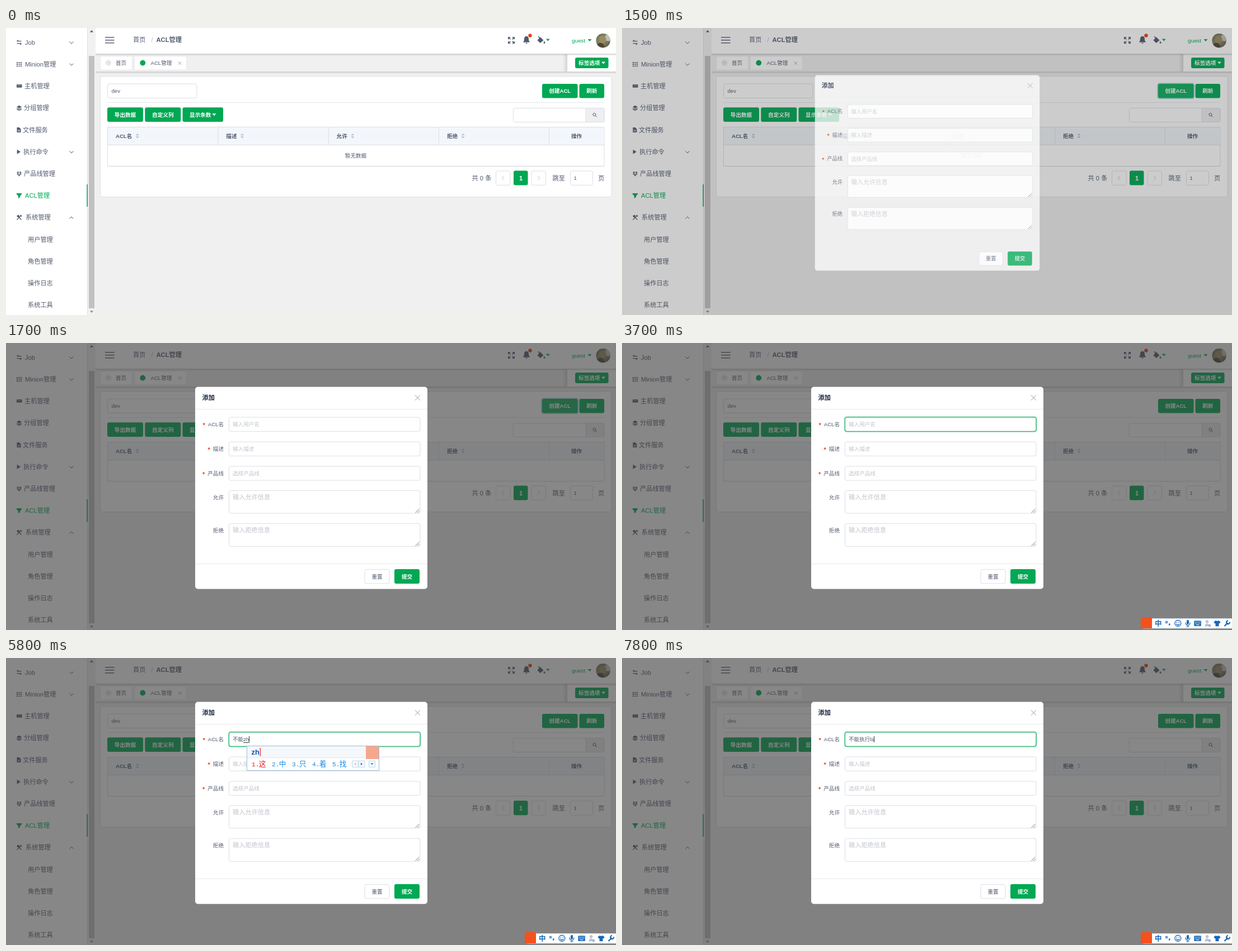
Animation of 1090x514 px, one loop 8000 ms. Source, as an HTML page with a canvas:

```html
<!DOCTYPE html>
<html lang="zh">
<head>
<meta charset="utf-8">
<title>ACL管理</title>
<style>
html, body { margin: 0; width: 100%; height: 100%; overflow: hidden; background: #f0f0f0; }
canvas { display: block; width: 1090px; height: 514px; }
</style>
</head>
<body>
<canvas id="stage"></canvas>
<script>
const W = 1090, H = 514, LOOP = 8000, STEP = 100;
const GREEN = '#00a854', INK = '#515a6e', LINE = '#dcdee2', PALE = '#c0c4cc', RED = '#ed3f14', BLUE = '#1868b7';
const SANS = '"Liberation Sans", "Noto Sans CJK SC", "Noto Sans CJK", sans-serif';
const MONO = '"Liberation Mono", "Noto Sans CJK SC", monospace';

const canvas = document.getElementById('stage');
const dpr = window.devicePixelRatio || 1;
canvas.width = W * dpr;
canvas.height = H * dpr;
const ctx = canvas.getContext('2d');
ctx.scale(dpr, dpr);

const clamp = v => Math.max(0, Math.min(1, v));

// ---- drawing helpers ----
function text(s, x, cy, size = 9.6, color = INK, weight = '', align = 'left', family = SANS) {
  ctx.font = `${weight} ${size}px ${family}`;
  ctx.fillStyle = color;
  ctx.textAlign = align;
  ctx.fillText(s, x, cy + size * 0.37);
  return ctx.measureText(s).width;
}

function rect(x, y, w, h, fill) {
  ctx.fillStyle = fill;
  ctx.fillRect(x, y, w, h);
}

function box(x1, y1, x2, y2, r, fill, stroke, width = 1) {
  ctx.beginPath();
  ctx.roundRect(x1, y1, x2 - x1, y2 - y1, r);
  if (fill) { ctx.fillStyle = fill; ctx.fill(); }
  if (stroke) { ctx.strokeStyle = stroke; ctx.lineWidth = width; ctx.stroke(); }
}

function dot(x, y, r, fill) {
  ctx.beginPath();
  ctx.arc(x, y, r, 0, Math.PI * 2);
  ctx.fillStyle = fill;
  ctx.fill();
}

function shape(d, x, y, fill, stroke, width = 1) {
  const path = new Path2D(d);
  ctx.save();
  ctx.translate(x, y);
  if (fill) { ctx.fillStyle = fill; ctx.fill(path); }
  if (stroke) { ctx.strokeStyle = stroke; ctx.lineWidth = width; ctx.stroke(path); }
  ctx.restore();
}

const caretDown = (x, y, color) => shape('M-3.5-2H3.5L0 2Z', x, y, color);
const cross = (x, y, r, color) => shape(`M${-r} ${-r}L${r} ${r}M${r} ${-r}L${-r} ${r}`, x, y, null, color);

function shade(x, y, w, h, strength, sideways) {
  const g = sideways ? ctx.createLinearGradient(x + w, 0, x, 0) : ctx.createLinearGradient(0, y, 0, y + h);
  g.addColorStop(0, `rgba(0,0,0,${strength})`);
  g.addColorStop(1, 'rgba(0,0,0,0)');
  rect(x, y, w, h, g);
}

function button(label, x1, y1, x2, y2, arrow) {
  box(x1, y1, x2, y2, 3, GREEN);
  const mid = (x1 + x2) / 2, cy = (y1 + y2) / 2;
  text(label, arrow ? mid - 4.5 : mid, cy, 9.6, '#fff', 'bold', 'center');
  if (arrow) caretDown(x2 - (x2 - x1 > 65 ? 16 : 9), cy, '#fff');
}

// ---- sidebar ----
const ICONS = {
  swap: ['', 'M-4-2H4M-4 2H4M-1.5-4.2L-4-2M1.5 4.2L4 2'],
  grid: ['M-4.5-4h2v2h-2zM-1-4h2v2h-2zM2.5-4h2v2h-2zM-4.5-.8h2v2h-2zM-1-.8h2v2h-2zM2.5-.8h2v2h-2zM-4.5 2.4h2v2h-2zM-1 2.4h2v2h-2zM2.5 2.4h2v2h-2z'],
  host: ['M-4.5-3H5V2.5H-4.5Z'],
  layers: ['M0-4.5L4.5-2 0 .5-4.5-2Z', 'M-4.2.2L0 2.3 4.2.2M-4.2 2.2L0 4.3 4.2 2.2'],
  file: ['M-4-4.5H0L3-1.5V4.5H-4Z'],
  play: ['M-3.8-4L2.5 0-3.8 4Z'],
  boxes: ['M-2.2-4L0-2.5-2.2-1-4.5-2.5ZM2.2-4L4.5-2.5 2.2-1 0-2.5ZM-2.2-1L0 .7-2.2 2.2-4.5.7ZM2.2-1L4.5.7 2.2 2.2 0 .7ZM0 1.6L2.2 3 0 4.5-2.2 3Z'],
  funnel: ['M-4.8-4.2H4.8V-2.8L1.6.8V3L-1.6 5V.8L-4.8-2.8Z'],
  tools: ['M-4.5-2.5L-1.5-4.8 1-2.5-2 .2Z', 'M-1.5-1.5L4 4.2M4-4L-4 4.2M2-4.3L4.6-1.6']
};
const MENU = [
  ['Job', 34, 'swap', 1], ['Minion管理', 34, 'grid', 1], ['主机管理', 33, 'host'], ['分组管理', 32, 'layers'],
  ['文件服务', 30, 'file'], ['执行命令', 31, 'play', 1], ['产品线管理', 32, 'boxes'], ['ACL管理', 34, 'funnel'],
  ['系统管理', 35, 'tools', -1], ['用户管理', 39], ['角色管理', 39], ['操作日志', 39], ['系统工具', 39]
];

function sidebar() {
  rect(0, 0, 146, H, '#fff');
  MENU.forEach(([label, x, icon, fold], i) => {
    const cy = 25.7 + i * 39.2, color = icon === 'funnel' ? GREEN : INK;
    text(label, x, cy, 11.2, color);
    if (icon) {
      const [solid, lines] = ICONS[icon];
      shape(solid, 23.5, cy, color, null);
      if (lines) shape(lines, 23.5, cy, null, color, 1.3);
    }
    if (icon === 'host') rect(20.5, cy - 1.5, 6, 1, '#aab0bb');
    if (icon === 'file') { rect(21, cy, 4, .8, '#fff'); rect(21, cy + 2, 4, .8, '#fff'); }
    if (fold) shape(`M-3.6 ${-1.8 * fold}L0 ${1.8 * fold}L3.6 ${-1.8 * fold}`, 117, cy + .5, null, INK);
  });
  rect(145, 0, 1, H, LINE);
  rect(144.4, 280, 1.6, 40, GREEN);
  rect(146, 0, 14, H, '#f1f1f1');
  rect(148, 50, 10, 452, '#c1c1c1');
  shape('M-3 1.5H3L0-2Z', 153, 6, '#505050');
  shape('M-3-1.5H3L0 2Z', 153, 508, '#858585');
}

// ---- top bars ----
function avatar(x, y, r) {
  ctx.save();
  ctx.beginPath();
  ctx.arc(x, y, r, 0, Math.PI * 2);
  ctx.clip();
  const g = ctx.createLinearGradient(x - r, y - r, x + r, y + r);
  g.addColorStop(0, '#65704f');
  g.addColorStop(.55, '#93896a');
  g.addColorStop(1, '#4a4a3c');
  rect(x - r, y - r, 2 * r, 2 * r, g);
  dot(x + 9, y - 5, 6, '#b9c2b8');
  dot(x - 1, y - 2, 6.5, '#9c8a62');
  dot(x - 5, y + 11, 7, '#4c4636');
  ctx.restore();
}

function header() {
  rect(160, 0, 930, 46, '#fff');
  shade(160, 46, 930, 4, .16);
  for (const y of [16, 21, 26]) rect(177, y, 16.5, 1.4, INK);
  text('首页', 227, 21, 11.2);
  text('/', 259.5, 21, 11.2, '#b5b9c2');
  text('ACL管理', 268.5, 21, 11.2, INK, 'bold');
  shape('M-5.3-1.8V-5.3H-1.8M1.8-5.3H5.3V-1.8M5.3 1.8V5.3H1.8M-1.8 5.3H-5.3V1.8M-5-5L-1.6-1.6M5-5L1.6-1.6M5 5L1.6 1.6M-5 5L-1.6 1.6', 903, 22, null, INK, 1.4);
  shape('M0-7C5-6.5 3.6-1 4.5 1.5L6.2 4H-6.2L-4.5 1.5C-3.6-1-5-6.5 0-7ZM-2 5H2Q0 8.5-2 5Z', 930, 21.5, INK);
  dot(936.5, 13.5, 3.2, RED);
  shape('M-1.5-5.5L4.5.5-1.5 5.5-6.5.5ZM6 2Q9 6 6 6.3Q3 6 6 2Z', 956, 21.5, INK);
  shape('M-5-6.5L-1-2', 956, 21.5, null, INK, 1.3);
  caretDown(968.3, 21.5, GREEN);
  text('guest', 1011, 22.5, 9.8, GREEN);
  caretDown(1043, 22, GREEN);
  avatar(1067, 22.5, 12.8);
}

function tabs() {
  box(168.5, 50.5, 225.5, 75, 2, '#fff', '#e8eaec');
  dot(183, 62.5, 4.9, '#e4e6ea');
  text('首页', 196, 62.7);
  box(229.5, 50.5, 322.5, 75, 2, '#fff', '#e8eaec');
  dot(244.3, 62.5, 4.9, GREEN);
  text('ACL管理', 258.5, 62.7);
  cross(310.5, 63, 2.8, '#a0a4ad');
  shade(995, 47, 8, 31, .12, true);
  rect(1003, 47, 87, 31, '#fff');
  button('标签选项', 1017, 53, 1076.5, 72, true);
  shade(160, 78, 930, 4, .16);
}

// ---- content card ----
function sorter(x, y) {
  shape('M-3.2-1H3.2L0-4.2ZM-3.2 1H3.2L0 4.2Z', x, y, '#bcc0c9');
}

function table() {
  box(181.5, 177.5, 1069, 247.5, 0, '#fff', LINE);
  rect(182, 178, 886.5, 31, '#f3f6fb');
  rect(181, 209, 888, 1, LINE);
  rect(181, 247, 888, 1, '#cfd3da');
  ['ACL名', '描述', '允许', '拒绝'].forEach((label, i) => {
    const x = 196 + i * 197.3;
    const w = text(label, x, 193.3, 9.6, INK, 'bold');
    sorter(x + w + 9.5, 193.3);
    rect(378.5 + i * 197.2, 178, 1, 31, LINE);
  });
  text('操作', 1019.5, 193.3, 9.6, INK, 'bold', 'center');
  text('暂无数据', 625, 228, 9.6, INK, '', 'center');
}

function pager() {
  text('共 0 条', 832.5, 268.5, 11.2);
  box(875.5, 256, 901, 281.5, 3, '#fff', LINE);
  box(907, 255.5, 932.5, 281.5, 3, GREEN);
  box(939, 256, 964.5, 281.5, 3, '#fff', LINE);
  shape('M2-3.6L-2 0 2 3.6', 888, 268.5, null, PALE);
  shape('M-2-3.6L2 0-2 3.6', 952, 268.5, null, PALE);
  text('1', 920, 268.5, 11.2, '#fff', 'bold', 'center');
  text('跳至', 976.5, 268.5, 11.2);
  box(1008.5, 256, 1048.5, 281.5, 3, '#fff', LINE);
  text('1', 1014.5, 268.8, 9.6);
  text('页', 1058, 268.5, 11.2);
}

function card(t) {
  box(168.5, 86.5, 1082, 302.5, 3, '#fff', LINE);
  box(181.5, 100, 341, 125.5, 3, '#fff', LINE);
  text('dev', 188.5, 112.8);
  const ring = clamp((t - 900) / 300) * (1 - clamp((t - 2000) / 400));
  if (ring) box(957.2, 99.2, 1022.3, 126.3, 3.5, null, `rgba(70,190,200,${.6 * ring})`, 1.6);
  button('创建ACL', 958, 100, 1021.5, 125.5);
  if (ring) box(958, 100, 1021.5, 125.5, 3, `rgba(255,255,255,${.06 * ring})`);
  button('刷新', 1024.5, 100, 1069, 125.5);
  rect(181, 133, 888, 1, '#e4e6ea');
  button('导出数据', 181, 142.3, 245, 168);
  button('自定义列', 248.3, 142.3, 312.3, 168);
  button('显示条数', 315.5, 142.3, 388, 168, true);
  box(906.5, 143.5, 1069, 168.5, 3, '#fff', LINE);
  box(1036, 143.5, 1069, 168.5, [0, 3, 3, 0], '#eeeff1', LINE);
  dotRing(1051.3, 155, 2.5);
  table();
  pager();
}

function dotRing(x, y, r) {
  ctx.beginPath();
  ctx.arc(x, y, r, 0, Math.PI * 2);
  ctx.moveTo(x + r * .7, y + r * .7);
  ctx.lineTo(x + r * 1.8, y + r * 1.8);
  ctx.strokeStyle = INK;
  ctx.lineWidth = 1;
  ctx.stroke();
}

// ---- typing: time, committed text, letters being composed, candidates ----
const TYPING = [
  [2200, '', ''],
  [4200, '', 'b', '不 吧 把 被 别'],
  [4300, '', 'bu', '不 部 步 布 补'],
  [4700, '不', ''],
  [4900, '不', 'ne', '呢 那 呐 哪 讷'],
  [5100, '不', 'neng', '能 嫩 恁 泞 弄'],
  [5200, '不能', ''],
  [5700, '不能', 'z', '在 这 中 做 再'],
  [5800, '不能', 'zh', '这 中 只 着 找'],
  [5900, '不能', 'zhi', '只 之 直 知 至'],
  [6000, '不能', 'zhix', '执行 之下 知晓 只想 直线'],
  [6100, '不能', 'zhixi', '致谢 窒息 知悉 执行 直系'],
  [6300, '不能', 'zhixin', '执行 知心 之心 至新 置信'],
  [6400, '不能', 'zhixing', '执行 知性 之行 直行 至性'],
  [6600, '不能执行', ''],
  [7100, '不能执行', 'l', '了 来 里 老 两'],
  [7200, '不能执行', 'ls', '老师 历史 老是 临时 零'],
  [7700, '不能执行ls', '']
];
const POPUP_X = { 0: 405, 1: 420, 2: 430, 4: 446 };

const typingAt = t => TYPING.filter(e => e[0] <= t).pop() || [0, '', ''];

function nameField(t) {
  const [since, done, typing] = typingAt(t);
  const focus = clamp((t - 2000) / 400);
  box(398.5, 133, 740, 158.3, 3, '#fff', LINE);
  if (focus) {
    ctx.save();
    ctx.globalAlpha *= focus;
    box(397.8, 132.3, 740.7, 159, 4, null, 'rgba(0,168,84,.3)', 2);
    box(398.5, 133, 740, 158.3, 3, null, '#1fb46a', 1.1);
    ctx.restore();
  }
  const shown = done + typing;
  let end = 405;
  if (shown) {
    const start = 405 + text(done, 405, 145.8);
    end = start + text(typing, start, 145.8);
    if (typing) rect(start, 151, end - start, 1, '#333');
  } else {
    text('输入用户名', 405, 145.5, 9.6, PALE);
  }
  const blinkOn = Math.floor((t - since) / 500) % 2 === 0;
  if (since && (typing || blinkOn)) rect(Math.round(end), 140, 1, 11, '#333');
}

function popup(t) {
  const [, done, typing, list] = typingAt(t);
  if (!typing) return;
  const words = list.split(' ');
  const extra = words.join('').length - words.length;
  const x = POPUP_X[done.length], right = x + 237 + extra * 12.8;
  box(x + .5, 157.5, right - .5, 201.5, 0, '#fff', '#9bbcd8');
  rect(x + 1, 158, right - x - 2, 20, '#f5f8fb');
  rect(x + 1, 178, right - x - 26, 1, '#dde6ee');
  const w = text(typing, x + 8.5, 168.3, 12.8, '#0f51b5', 'bold');
  rect(x + 9.5 + w, 161, 1.2, 15, '#f01818');
  let cx = x + 9;
  words.forEach((word, i) => {
    const color = i ? '#1488e0' : '#f01818';
    text(`${i + 1}.`, cx, 190, 11.2, color, '', 'left', MONO);
    text(word, cx + 12.8, 189.5, 12.8, color);
    cx += 23.2 + word.length * 12.8;
  });
  for (const [dx, d, color] of [[-43, 'M1.5-2.5V2.5L-1.5 0Z', '#b5c5d5'], [-31.5, 'M-1.5-2.5V2.5L1.5 0Z', '#1570c8'], [-13, 'M-2.5-1.2H2.5L0 1.6Z', '#1570c8']]) {
    box(right + dx - 5.5, 184, right + dx + 5.5, 195.5, 0, '#f4f9fd', '#c0d8ea');
    shape(d, right + dx, 189.7, color);
  }
  rect(right - 24, 158, 23, 23, '#f5a78c');
}

// ---- dialog ----
function field(label, y1, y2, hint, required, area) {
  const cy = area ? y1 + 12 : (y1 + y2) / 2;
  const w = text(label, 389, cy - .3, 9.6, INK, '', 'right');
  if (required) text('*', 389 - w - 9.3, cy + 1.5, 11, RED, 'bold');
  if (!hint) return;
  box(398.5, y1, 740, y2, 3, '#fff', LINE);
  text(hint, 405, cy, area ? 11.2 : 9.6, PALE);
  if (area) shape('M-7 0L0-7M-3.2 0L0-3.2', 738.5, y2 - 1, null, '#666', .9);
}

function dialog(t) {
  box(338, 78.5, 753, 440.5, 4.8, '#fff');
  text('添加', 350.5, 98, 11.2, '#17233d', 'bold');
  cross(735.5, 98, 4.6, '#999');
  rect(338, 118, 415, 1, '#e8eaec');
  field('ACL名', 133, 158, '', true);
  nameField(t);
  field('描述', 177, 202.3, '输入描述', true);
  field('产品线', 220.8, 246, '选择产品线', true);
  field('允许', 264.3, 305, '输入允许信息', false, true);
  field('拒绝', 323.3, 364.3, '输入拒绝信息', false, true);
  rect(338, 395, 415, 1, '#e8eaec');
  box(641, 405.5, 685, 430.8, 3, '#fff', LINE);
  text('重置', 663, 418, 9.6, INK, '', 'center');
  button('提交', 694, 405, 739, 431);
}

function modalLayer(t) {
  const k = clamp((t - 1300) / 400);
  if (!k) return;
  rect(0, 0, W, H, `rgba(55,55,55,${.6 * k ** 1.25})`);
  const ease = 1 - (1 - k) ** 2, scale = .87 + .13 * ease;
  ctx.save();
  ctx.globalAlpha = ease;
  ctx.translate(545.5, 259.5);
  ctx.scale(scale, scale);
  ctx.translate(-545.5, -259.5);
  dialog(t);
  ctx.restore();
}

// ---- input method bar ----
function imeBar(t) {
  if (t < 2200) return;
  const chinese = t >= 3700, cy = 502;
  box(930, 493.5, 1092, 511, 2, '#fff', '#c9dbea');
  rect(927, 491, 20, 20, '#f4511e');
  text(chinese ? '中' : '英', 958.3, cy, 12.5, BLUE, 'bold', 'center');
  if (chinese) {
    ctx.beginPath();
    ctx.arc(973, 500, 1.6, 0, Math.PI * 2);
    ctx.strokeStyle = BLUE;
    ctx.lineWidth = 1.2;
    ctx.stroke();
  } else {
    dot(973, 500, 1.4, BLUE);
  }
  shape('M-1-1.5H1.5V.5L-.5 3V.8H-1Z', 978, 504, BLUE);
  shape('M5.5 0A5.5 5.5 0 1 1-5.5 0A5.5 5.5 0 1 1 5.5 0M-3 1Q0 5 3 1', 993.3, cy, null, BLUE, 1.3);
  dot(991.3, 500.3, .9, BLUE);
  dot(995.3, 500.3, .9, BLUE);
  box(1009, 496, 1013, 504, 2, BLUE);
  shape('M-4-1Q-4 4 0 4Q4 4 4-1M0 4V6.5M-2.5 6.5H2.5', 1011, 501.5, null, BLUE, 1.2);
  box(1022.3, 497.5, 1034.8, 507, 1, BLUE);
  for (let i = 0; i < 8; i++) rect(1024 + (i % 4) * 2.6, 499.3 + (i >> 2) * 2.3, 1.4, 1.1, '#fff');
  rect(1025.5, 504.2, 6, 1.1, '#fff');
  dot(1045.5, 499, 2.8, '#b9c5d6');
  shape('M-4.5 5Q-4 0 0 0Q4 0 4.5 5Z', 1045.5, 502.5, '#b9c5d6');
  dot(1050, 506, 2.2, '#9fb0c6');
  shape('M-2.5-5Q0-3 2.5-5L6-2.5 4.5.5 3-.3V5.2H-3V-.3L-4.5.5-6-2.5Z', 1063.5, cy, BLUE);
  shape('M-4.5 4.5L1.5-1.5', 1081, cy + .5, null, BLUE, 2.4);
  shape('M4.8-3A3 3 0 1 1 2-5.2', 1081, cy + .5, null, BLUE, 2);
}

function render(t) {
  rect(0, 0, W, H, '#f0f0f0');
  card(t);
  tabs();
  header();
  sidebar();
  modalLayer(t);
  popup(t);
  imeBar(t);
}

let last = -1;
function tick() {
  const t = Math.floor(performance.now() % LOOP / STEP) * STEP;
  if (t !== last) render(last = t);
  requestAnimationFrame(tick);
}
tick();
</script>
</body>
</html>
```
